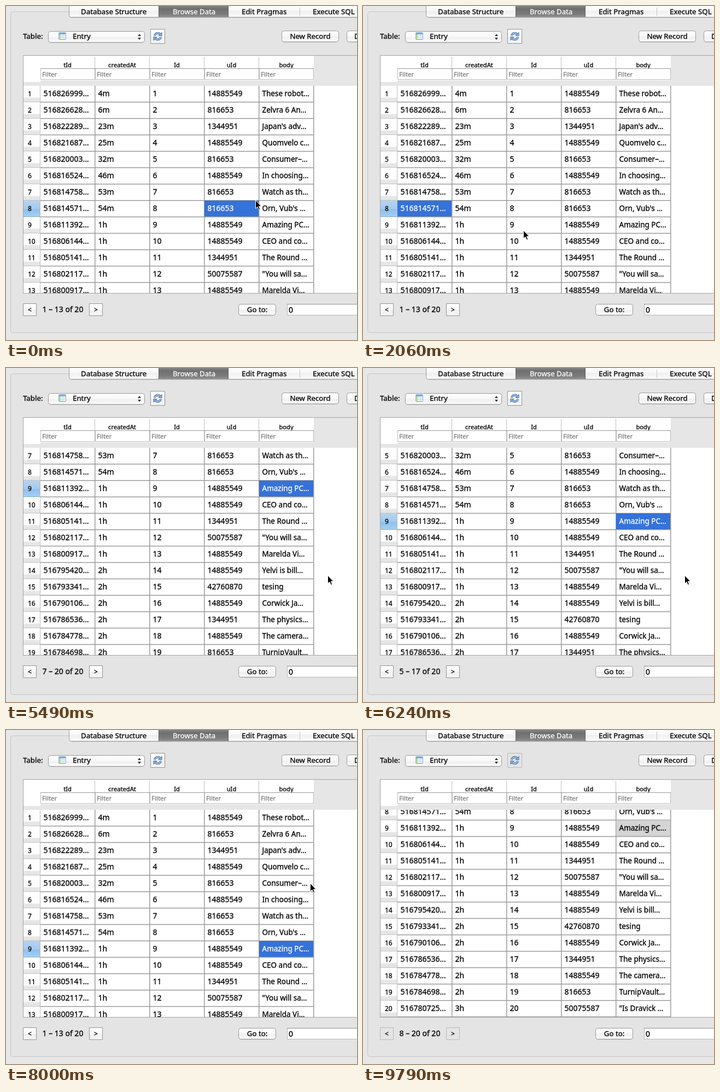
Recreate the animation shown at these times as an HTML page with a canvas. Size 642 by 611 pixels, loop 9840 ms.

```html
<!DOCTYPE html>
<html lang="en">
<head>
<meta charset="utf-8">
<title>Table browser</title>
<style>
html, body { margin: 0; width: 100%; height: 100%; overflow: hidden; background: #e6e6e6; }
canvas { display: block; width: 642px; height: 611px; }
</style>
</head>
<body>
<canvas id="stage" width="642" height="611"></canvas>
<script>
const ctx = document.getElementById('stage').getContext('2d');
const LOOP = 9840, STEP = 148.1, BLUR_STEP = 66;
const FONT = '"Noto Sans", "Open Sans", sans-serif';
const LEFT = 63, TOP = 146, BOTTOM = 525, ROW = 30, COL = 100, MAX_SCROLL = 221;
const GRID = '#9c9c9c';
const HEADS = ['tId', 'createdAt', 'Id', 'uId', 'body'];
const USERS = { a: '14885549', b: '816653', c: '1344951', d: '50075587', e: '42760870' };

// Table content: id, user, body
const rows = `826999 a These robot…
826628 b Zelvra 6 An…
822289 c Japan's adv…
821687 a Quomvelo c…
820003 b Consumer–…
816524 a In choosing…
814758 b Watch as th…
814571 b Orn, Vub's …
811392 a Amazing PC…
806144 a CEO and co…
805141 c The Round …
802117 d "You will sa…
800917 a Marelda Vi…
795420 a Yelvi is bill…
793341 e tesing
790106 a Corwick Ja…
786536 c The physics…
784778 a The camera…
784698 b TurnipVault…
780725 d "Is Dravick …`.split('\n').map((line, i) => {
  const [id, user, ...body] = line.split(' ');
  return [`516${id}…`, age(id), String(i + 1), USERS[user], body.join(' ')];
});

// Ids grow by 250 a minute, so the age follows from the id
function age(id) {
  const minutes = Math.round((828050 - id) / 250);
  return minutes < 60 ? minutes + 'm' : Math.floor(minutes / 60) + 'h';
}

// Pointer glides in steps; a click selects the cell below the end point
const GLIDES = [
  { from: 0, to: 0, x: 457, y: 356, click: true },
  { from: 0, to: 3, x: 318, y: 304, click: true },
  { from: 4, to: 9, x: 110, y: 368, click: true },
  { from: 9, to: 12, x: 284, y: 411 },
  { from: 12, to: 16, x: 346, y: 409 },
  { from: 18, to: 21, x: 412, y: 425, click: true },
  { from: 22, to: 24, x: 436, y: 284 },
  { from: 25, to: 30, x: 528, y: 402, click: true },
  { from: 33, to: 37, x: 589, y: 380 },
  { from: 44, to: 50, x: 562, y: 122 },
  { from: 51, to: 54, x: 557, y: 281 },
  { from: 59, to: 64, x: 599, y: 620 },
];
// Flicks run the list to its far end and back in turn
const FLICKS = [[34, 4], [41, 2], [46, 3], [51, 3], [57, 1]];

const clamp = p => Math.max(0, Math.min(1, p));
const ease = p => p * p * (3 - 2 * p);

function pointerAt(n) {
  let { x, y } = GLIDES[0];
  for (const g of GLIDES.slice(1)) {
    const p = ease(clamp((n - g.from) / (g.to - g.from)));
    x += (g.x - x) * p;
    y += (g.y - y) * p;
  }
  return [x, y];
}

function selectionAt(n) {
  const { x, y } = GLIDES.filter(g => g.click && g.to <= n).pop();
  return [Math.floor((y - TOP) / ROW), Math.floor((x - LEFT) / COL)];
}

function scrollAt(n) {
  const first = FLICKS.reduce((sum, [start, steps], i) =>
    sum + (i % 2 ? -8 : 8) * clamp((n - start) / steps), 0);
  return Math.min(Math.round(first) * ROW, MAX_SCROLL);
}

function fill(x, y, w, h, color) {
  ctx.fillStyle = color;
  ctx.fillRect(x, y, w, h);
}

function text(s, x, y, size = 13.3, color = '#000', align = 'left') {
  ctx.font = `${size}px ${FONT}`;
  ctx.textAlign = align;
  ctx.fillStyle = ctx.strokeStyle = color;
  ctx.lineWidth = .3;
  ctx.fillText(s, x, y);
  ctx.strokeText(s, x, y);
}

function shade(y, h, ...stops) {
  const g = ctx.createLinearGradient(0, y, 0, y + h);
  stops.forEach(([p, c]) => g.addColorStop(p, c));
  return g;
}

function box(x, y, w, h, r, paint, stroke) {
  ctx.beginPath();
  ctx.roundRect(x + .5, y + .5, w - 1, h - 1, r);
  ctx.fillStyle = paint;
  ctx.fill();
  ctx.strokeStyle = stroke;
  ctx.lineWidth = 1;
  ctx.stroke();
}

function shape(points, color) {
  ctx.beginPath();
  points.forEach(([x, y]) => ctx.lineTo(x, y));
  ctx.closePath();
  ctx.fillStyle = color;
  ctx.fill();
}

function button(x, y, w, h = 21) {
  fill(x + 3, y + h, w - 6, 1, '#cfcfcf');
  box(x, y, w, h, 4, shade(y, h, [0, '#fff'], [.5, '#f8f8f8'], [.52, '#efefef'], [1, '#fcfcfc']), '#999');
}

function squareButton(x, y, w, h, blurred) {
  const paint = blurred ? '#e4e4e4' : shade(y, h, [0, '#fff'], [.5, '#fafafa'], [.52, '#f0f0f0'], [1, '#f6f6f6']);
  box(x, y, w, h, 0, paint, blurred ? '#b9b9b9' : '#929292');
}

function tabs() {
  box(8, 10, 660, 588, 4, '#e4e4e4', '#c6c6c6');
  button(115, -4, 560, 25);
  fill(280, 0, 127, 20, shade(0, 20, [0, '#858585'], [.25, '#6f6f6f'], [.75, '#7c7c7c'], [1, '#929292']));
  fill(279, 0, 1, 20, '#606060');
  fill(406, 0, 1, 20, '#606060');
  fill(537, 3, 1, 15, '#c4c4c4');
  text('Database Structure', 137, 15);
  text('Browse Data', 305, 15, 13.2, '#fff');
  text('Edit Pragmas', 431, 15);
  text('Execute SQL', 561, 15);
}

function refreshIcon(x, y) {
  for (const turn of [0, Math.PI]) {
    ctx.save();
    ctx.translate(x, y);
    ctx.rotate(turn);
    shape([[8, -8], [8, -.5], [.5, -1]], '#4a73ad');
    for (const [width, color] of [[4, '#4a73ad'], [2, '#9fc0e6']]) {
      ctx.beginPath();
      ctx.arc(0, 0, 5.8, Math.PI * 1.06, Math.PI * 1.75);
      ctx.strokeStyle = color;
      ctx.lineWidth = width;
      ctx.stroke();
    }
    shape([[6.8, -5.5], [6.8, -1.8], [3.2, -2]], '#9fc0e6');
    ctx.restore();
  }
}

function toolbar(blurred) {
  text('Table:', 31, 60);
  button(77, 46, 177);
  box(96, 48, 14, 14, 1, '#fff', '#86b3d6');
  fill(97, 49, 12, 3, '#73aee0');
  fill(97, 52, 3, 9, '#b9d98f');
  for (let i = 0; i < 3; i++) fill(100, 54 + i * 3, 9, 1, '#a9cbe8');
  fill(104, 52, 1, 9, '#c3dbee');
  text('Entry', 122, 60);
  shape([[241, 55], [247, 55], [244, 51]], '#333');
  shape([[241, 58], [247, 58], [244, 62]], '#333');
  squareButton(264, 42, 27, 27, blurred);
  refreshIcon(277.5, 55.5);
  button(504, 45, 105);
  text('New Record', 556.5, 60, 13.2, '#000', 'center');
  button(623, 45, 60);
  text('D', 637, 60);
}

function header() {
  fill(31, 90, 611, 436, '#a3a3a3');
  fill(32, 91, 610, 55, '#e6e6e6');
  fill(32, 91, 531, 45, '#fff');
  fill(32, 136, 31, 3, '#fff');
  HEADS.forEach((name, i) => {
    const x = LEFT + i * COL;
    text(name, x + 49.5, 112, 11.2, '#000', 'center');
    if (i) fill(x - 1, 93, 1, 21, '#c0c0c0');
    box(x, 114, COL, 21, 0, '#fff', '#b9b9b9');
    fill(x, 114, COL, 1, '#9a9a9a');
    text('Filter', x + 3, 129, 11.5, '#7d7d7d');
  });
}

function rowHead(y, label, active) {
  fill(32, y, 30, ROW, active
    ? shade(y, ROW, [0, '#b4d4f1'], [.5, '#a3caef'], [.55, '#8fbfec'], [1, '#a6d0f5'])
    : shade(y, ROW, [0, '#fff'], [.7, '#fdfdfd'], [.74, '#e7e7e7'], [1, '#e4e4e4']));
  fill(62, y, 1, ROW, '#bdbdbd');
  fill(32, y + ROW - 1, 31, 1, active ? '#86aed2' : '#c4c4c4');
  text(label, 40, y + 19, 12);
}

function table(offset, [selRow, selCol], blurred) {
  ctx.save();
  ctx.beginPath();
  ctx.rect(32, TOP, 610, BOTTOM - TOP);
  ctx.clip();
  fill(32, TOP, 610, BOTTOM - TOP, '#fff');
  rows.forEach((cells, i) => {
    const y = TOP + i * ROW - offset;
    if (y + ROW <= TOP || y >= BOTTOM) return;
    rowHead(y, i + 1, i === selRow && !blurred);
    cells.forEach((value, c) => {
      const x = LEFT + c * COL, on = i === selRow && c === selCol;
      if (on) fill(x, y, COL - 1, ROW - 1, blurred ? '#d4d4d4' : '#3572d9');
      text(value, x + 5.5, y + 19, c === 4 ? 13.5 : 14, on && !blurred ? '#fff' : '#000');
      fill(x + COL - 1, y, 1.5, ROW, GRID);
    });
    fill(LEFT, y + ROW - 1, 500, 1.5, GRID);
  });
  ctx.restore();
}

function footer(offset, blurred) {
  const from = Math.floor(offset / ROW) + 1, to = from > 6 ? 20 : from + 12;
  squareButton(31, 544, 25, 23, blurred);
  squareButton(152, 544, 25, 23, blurred);
  text('<', 43.5, 560, 12, '#000', 'center');
  text('>', 164.5, 560, 12, '#000', 'center');
  text(`${from} – ${to} of 20`, 66.5, 560, 14);
  button(425, 545, 69);
  text('Go to:', 459.5, 560, 13.3, '#000', 'center');
  box(514, 545, 140, 21, 0, '#fff', '#b5b5b5');
  fill(514, 545, 128, 1, '#8e8e8e');
  text('0', 517, 561, 14);
}

function pointer(x, y) {
  ctx.save();
  ctx.translate(Math.round(x) - .5, Math.round(y) - .5);
  ctx.lineJoin = 'round';
  shape([[0, 0], [0, 15], [3.4, 11.8], [5.8, 17.2], [8.2, 16.2], [5.9, 11], [10.5, 11]], '#000');
  ctx.strokeStyle = '#fff';
  ctx.lineWidth = 1;
  ctx.stroke();
  ctx.restore();
}

function draw(ms) {
  const n = Math.floor((ms + 10) / STEP);
  const blurred = n >= BLUR_STEP, offset = scrollAt(n);
  fill(0, 0, 642, 611, '#e7e7e7');
  tabs();
  toolbar(blurred);
  header();
  table(offset, selectionAt(n), blurred);
  footer(offset, blurred);
  pointer(...pointerAt(n));
}

const start = performance.now();
function tick() {
  draw((performance.now() - start) % LOOP);
  requestAnimationFrame(tick);
}
tick();
</script>
</body>
</html>
```
